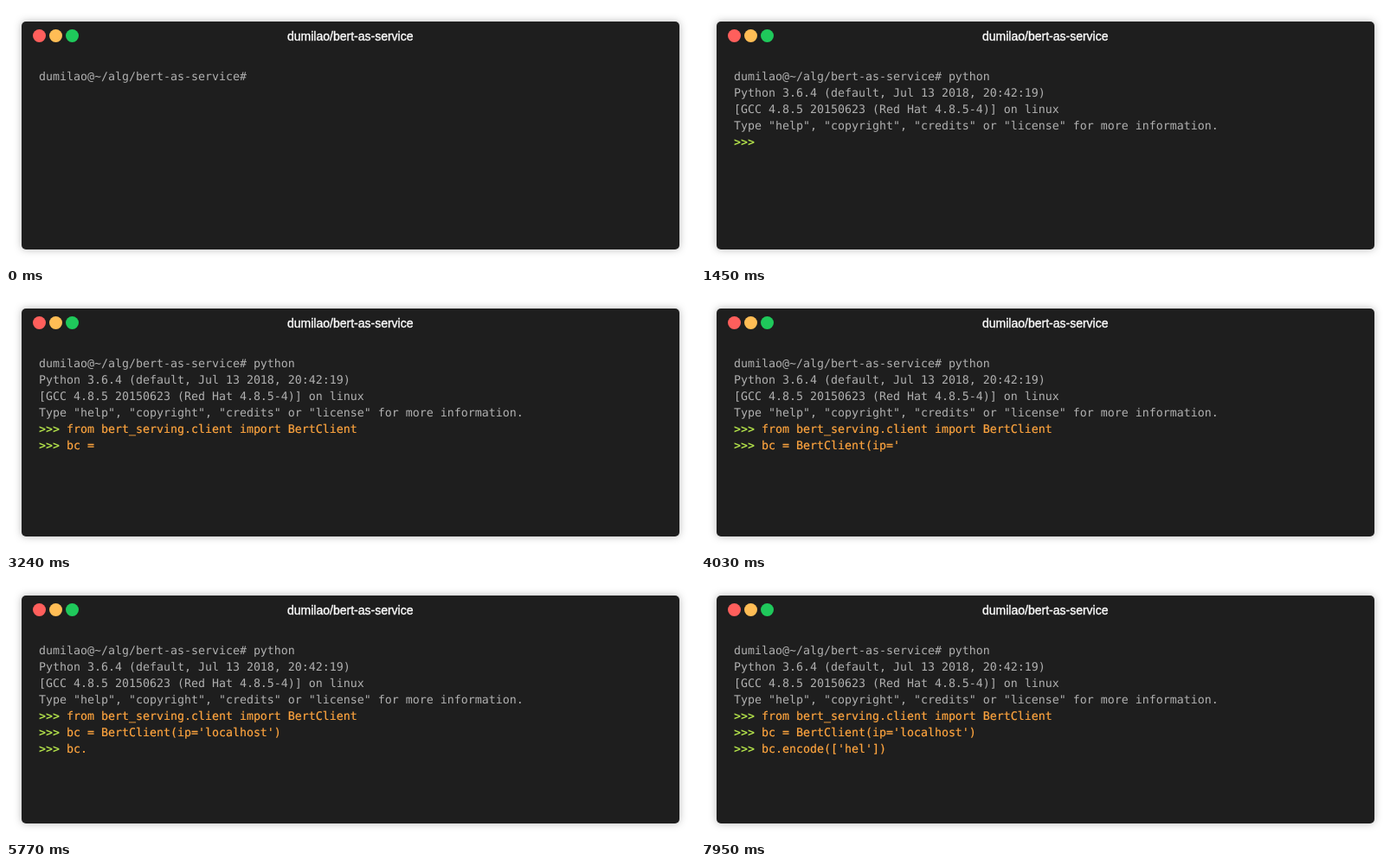
An HTML page that plays this animation: 796x300 px, repeating every 8000 ms.

```html
<!DOCTYPE html>
<html lang="en">
<head>
<meta charset="utf-8">
<title>Terminal</title>
<style>
  html, body { margin: 0; height: 100%; overflow: hidden; background: #fff; }
  svg { display: block; }
  .window { fill: #1e1e1e; filter: drop-shadow(0 0 5px rgba(0, 0, 0, .28)); }
  .title { font: 14px "Liberation Sans", Arial, sans-serif; fill: #fff; stroke: #fff; stroke-width: .35px; }
  #screen { font: 13.29px "DejaVu Sans Mono", monospace; fill: #b0b0b0; text-rendering: geometricPrecision; }
  #screen text { white-space: pre; }
  .prompt { fill: #b2e04a; font-weight: bold; }
  .code { fill: #ffa53f; stroke: #ffa53f; stroke-width: .2px; }
</style>
</head>
<body>
<svg width="796" height="300">
  <rect class="window" x="18" y="18" width="760" height="264" rx="5"/>
  <circle cx="38.5" cy="34.5" r="7.5" fill="#ff5f5c"/>
  <circle cx="57.5" cy="34.5" r="7.5" fill="#ffbd55"/>
  <circle cx="76.5" cy="34.5" r="7.5" fill="#1fc95b"/>
  <text class="title" x="325" y="40">dumilao/bert-as-service</text>
  <g id="screen"></g>
</svg>
<script>
const LOOP = 8000, LEFT = 38, BASELINE = 86, LINE = 19;
const shell = 'dumilao@~/alg/bert-as-service# ';
const banner = [
  'Python 3.6.4 (default, Jul 13 2018, 20:42:19)',
  '[GCC 4.8.5 20150623 (Red Hat 4.8.5-4)] on linux',
  'Type "help", "copyright", "credits" or "license" for more information.'
];

// Each step sets the text of one line from the given time on.
const steps = [
  [0, 0, shell],
  [1180, 0, shell + 'pyt'],
  [1240, 0, shell + 'python'],
  ...banner.map((text, i) => [1450, i + 1, text]),
  [1450, 4, '>>> '],
  [2310, 4, '>>> from bert_serving.client import BertClient'],
  [2460, 5, '>>> bc '],
  [3240, 5, '>>> bc = '],
  [3650, 5, '>>> bc = Bert'],
  [3860, 5, '>>> bc = BertClient'],
  [4030, 5, ">>> bc = BertClient(ip='"],
  [4260, 5, ">>> bc = BertClient(ip='localhost')"],
  [4260, 6, '>>> '],
  [5770, 6, '>>> bc.'],
  [5910, 6, '>>> bc.enc'],
  [6100, 6, '>>> bc.encode'],
  [6890, 6, '>>> bc.encode()'],
  [7230, 6, '>>> bc.encode([])'],
  [7470, 6, ">>> bc.encode([''])"],
  [7950, 6, ">>> bc.encode(['hel'])"]
];

function make(tag, attrs, parent) {
  const node = document.createElementNS('http://www.w3.org/2000/svg', tag);
  for (const key in attrs) node.setAttribute(key, attrs[key]);
  return parent.appendChild(node);
}

const screen = document.getElementById('screen');
const rows = Array.from({ length: 7 }, (_, i) => {
  const text = make('text', { x: LEFT, y: BASELINE + i * LINE }, screen);
  if (i < 4) return { body: make('tspan', {}, text) };
  return {
    prompt: make('tspan', { class: 'prompt' }, text),
    body: make('tspan', { class: 'code' }, text)
  };
});

function setRow({ prompt, body }, text) {
  if (prompt) prompt.textContent = text.slice(0, 4);
  body.textContent = prompt ? text.slice(4) : text;
}

const start = performance.now();
let shown = -1;

function draw() {
  const time = (performance.now() - start) % LOOP;
  const count = steps.filter(([at]) => at <= time).length;
  if (count !== shown) {
    const lines = Array(rows.length).fill('');
    for (const [, row, text] of steps.slice(0, count)) lines[row] = text;
    rows.forEach((row, i) => setRow(row, lines[i]));
    shown = count;
  }
  requestAnimationFrame(draw);
}
draw();
</script>
</body>
</html>
```
